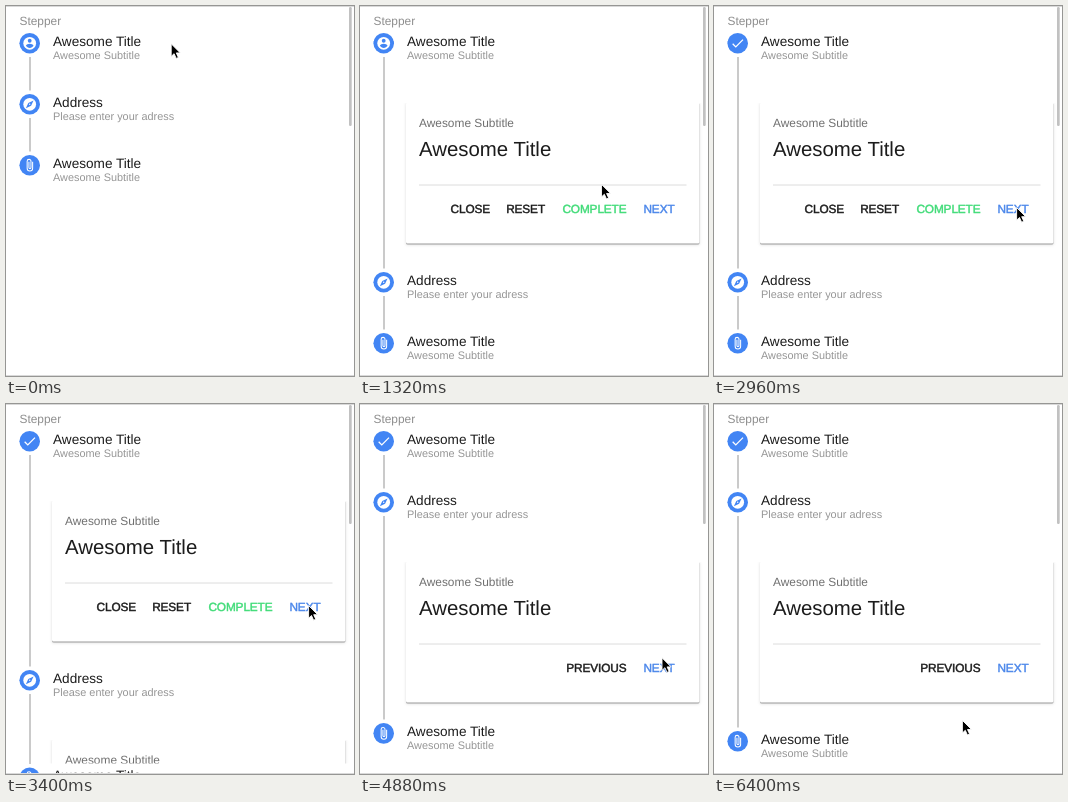
Recreate the animation shown at these times as an HTML page. Size 348x370 px, loop 6640 ms.

```html
<!DOCTYPE html>
<html lang="en">
<head>
<meta charset="utf-8">
<title>Stepper</title>
<style>
  html, body { margin: 0; width: 100%; height: 100%; overflow: hidden; background: #fff; }
  svg { display: block; }
  text { font-family: "Liberation Sans", Arial, sans-serif; text-rendering: geometricPrecision; fill: #1c1c1c; }
  .title { font-size: 13.6px; }
  .sub { font-size: 10.9px; fill: #969696; }
  .head { font-size: 11.9px; fill: #8e8e8e; }
  .card-sub { font-size: 11.9px; fill: #707070; }
  .card-title { font-size: 20.4px; }
  .button { font-size: 11.8px; letter-spacing: -.1px; stroke-width: .45px; stroke: currentColor; fill: currentColor; }
  .card { fill: #fff; filter: drop-shadow(0 1px .6px #0005) drop-shadow(0 1px 1.6px #0002); }
  .blue { fill: #4285f4; }
  .white { fill: #fff; }
  .stroke { fill: none; stroke: #fff; }
</style>
</head>
<body>
<svg id="stage" width="348" height="370" viewBox="0 0 348 370"></svg>
<script>
const LOOP = 6640, TICK = 40, PITCH = 61, CONTENT = 178;
const stage = document.getElementById('stage');
const $ = id => document.getElementById(id);

const icons = [
  `<g id="person"><circle class="white" cx="12" cy="12" r="10"/>
   <circle class="blue" cx="12" cy="8" r="3"/>
   <path class="blue" d="M12 19.2c-2.5 0-4.7-1.3-6-3.2 0-2 4-3.1 6-3.1s6 1.1 6 3.1c-1.3 1.9-3.5 3.2-6 3.2z"/></g>
   <path id="check" class="stroke" stroke-width="2" d="M4.1 12.7L9 17.6 20.3 6.3"/>`,
  `<circle class="white" cx="12" cy="12" r="10"/>
   <path class="blue" d="M14.2 14.2L6 18l3.8-8.2L18 6z"/><circle class="white" cx="12" cy="12" r="1.1"/>`,
  `<path class="stroke" stroke-width="1.6"
   d="M16.6 6.5v10.3a4.3 4.3 0 0 1-8.6 0V5.7a3 3 0 0 1 6 0v9.6a1.6 1.6 0 0 1-3.2 0V6.5"/>`
];
const awesome = ['Awesome Title', 'Awesome Subtitle'];
const steps = [awesome, ['Address', 'Please enter your adress'], awesome];

const label = (cls, x, y, text) => `<text class="${cls}" x="${x}" y="${y}">${text}</text>`;
const button = (end, text, color = '#1c1c1c') =>
  `<text class="button" x="${end}" y="207" text-anchor="end" color="${color}">${text}</text>`;

function stepMarkup([title, sub], i) {
  const extra = i
    ? button(266.5, 'PREVIOUS')
    : button(130, 'CLOSE') + button(185, 'RESET') + button(266.5, 'COMPLETE', '#3fdb77');
  return `<clipPath id="clip${i}"><rect id="window${i}" x="40" y="97" width="305" height="0"/></clipPath>
  <g id="step${i}">
    ${i < 2 ? `<path id="line${i}" stroke="#bdbdbd" stroke-width="1.6"/>` : ''}
    <circle class="blue" cx="23.7" cy="37.3" r="10.3"/>
    <g transform="translate(16.05 29.65) scale(.6375)">${icons[i]}</g>
    ${label('title', 47, 39.8, title)}${label('sub', 47, 52.6, sub)}
    <g clip-path="url(#clip${i})">
      <rect class="card" x="46" y="96" width="293.5" height="141.5" rx="1.5"/>
      ${label('card-sub', 59, 121.1, awesome[1])}${label('card-title', 59, 150.3, awesome[0])}
      <path d="M59 179H326.5" stroke="#dcdcdc"/>
      ${extra}${button(314.5, 'NEXT', '#4a86ea')}
    </g>
  </g>`;
}

stage.innerHTML = label('head', 13.5, 18.8, 'Stepper') + steps.map(stepMarkup).join('') +
  `<path d="M0 .5H348M0 369.5H348" stroke="#d9d9d9"/>
   <rect x="343" y="1" width="2.7" height="119" rx="1.3" fill="#c1c1c1"/>
   <path id="cursor" d="M0 0V12.6L2.9 9.9 5 14.6 7.2 13.7 5.1 9.1H9.1Z" stroke="#fff" stroke-width=".9"/>`;

const ramp = (t, from, to) => Math.min(1, Math.max(0, (t - from) / (to - from)));
const inOut = (p, n) => p < .5 ? (2 * p) ** n / 2 : 1 - (2 - 2 * p) ** n / 2;
const slide = (t, from, to) => inOut(ramp(t, from, to), 2.2);

// Each move: start, end, control point, end point
const moves = [
  [880, 1560, 246, 145, 243, 199],
  [1640, 1720, 243, 200, 243, 201.3],
  [2520, 2960, 273, 210, 302.6, 201.6],
  [4200, 4640, 302.3, 227, 302, 253.8],
  [5440, 5920, 277, 289, 248.4, 316.4]
];

function cursorAt(t) {
  let x = 165.2, y = 37.8;
  for (const [from, to, cx, cy, ex, ey] of moves) {
    if (t < from) break;
    const p = inOut(ramp(t, from, to), 3), q = 1 - p;
    x = q * q * x + 2 * p * q * cx + p * p * ex;
    y = q * q * y + 2 * p * q * cy + p * p * ey;
  }
  return [x, y];
}

function draw(t) {
  // Closing starts later than opening; both settle together
  const open = [
    slide(t, 400, 760) - slide(t, 3400, 3640),
    slide(t, 3280, 3640) - slide(t, 4840, 5080) + slide(t, 6040, 6400),
    slide(t, 4720, 5080) - slide(t, 6160, 6400)
  ];
  let y = 0;
  open.forEach((amount, i) => {
    const height = amount * CONTENT;
    $('step' + i).setAttribute('transform', `translate(0 ${y})`);
    $('window' + i).setAttribute('height', Math.max(0, height - 13));
    if (i < 2) $('line' + i).setAttribute('d', `M24 51V${PITCH + height + 23.5}`);
    y += PITCH + height;
  });
  const done = ramp(t, 1920, 2200);
  $('person').setAttribute('opacity', 1 - done);
  $('check').setAttribute('opacity', done);
  $('cursor').setAttribute('transform', `translate(${cursorAt(t)})`);
}

const start = performance.now();
function frame() {
  const t = (performance.now() - start) % LOOP;
  draw(Math.floor(t / TICK) * TICK);
  requestAnimationFrame(frame);
}
frame();
</script>
</body>
</html>
```
